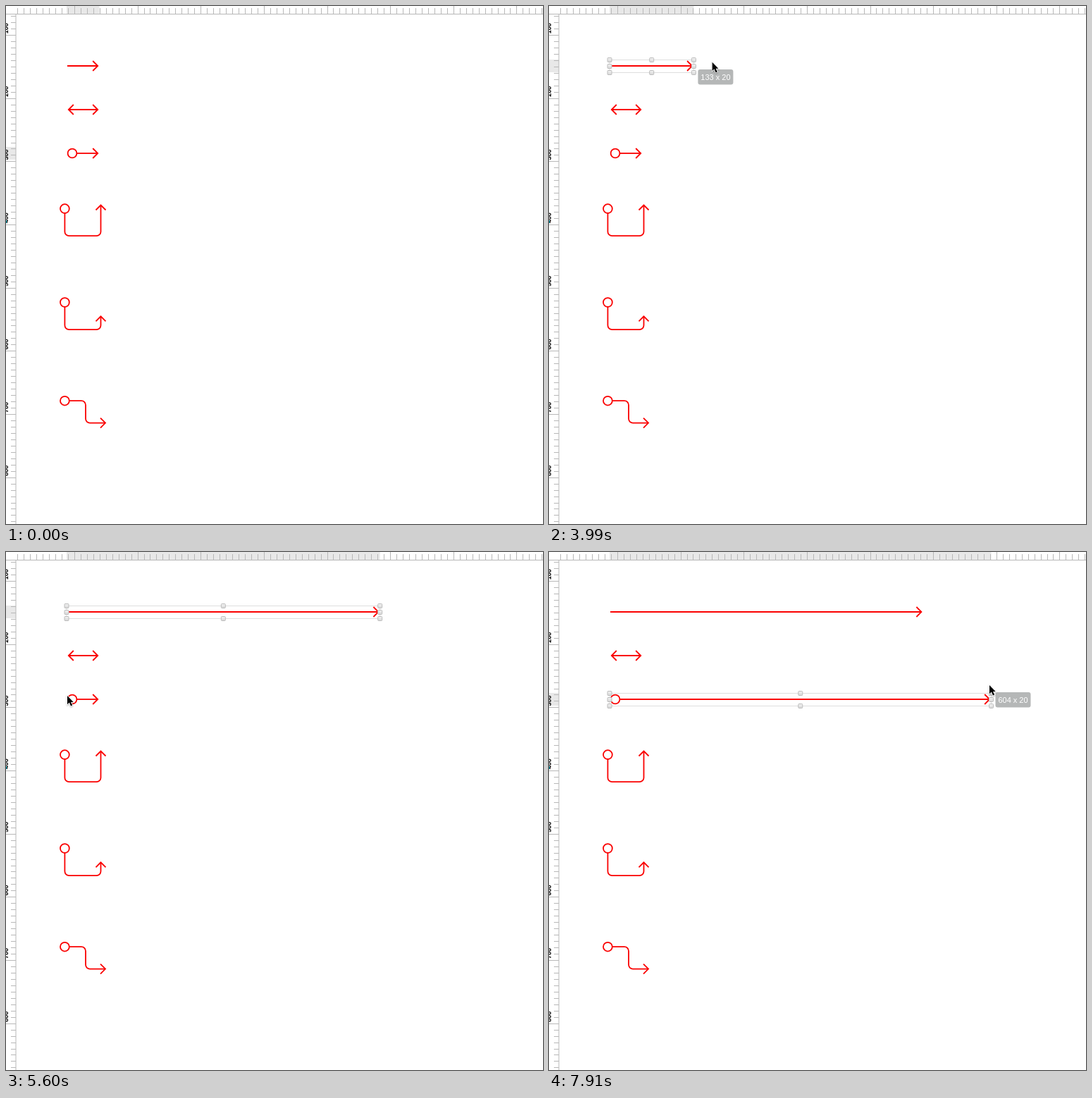
Animation of 762 by 735 pixels, one loop 8000 ms. Source, as an HTML page with a canvas:

```html
<!DOCTYPE html>
<html lang="en">
<head>
<meta charset="utf-8">
<title>Resizable arrows</title>
<style>
  html, body { margin: 0; width: 100%; height: 100%; overflow: hidden; background: #fff; }
  canvas { display: block; }
</style>
</head>
<body>
<canvas id="stage" width="762" height="735"></canvas>
<script>
const ctx = document.getElementById('stage').getContext('2d');
const W = 762, H = 735, LOOP = 8000, STEP = 70;
const SCALE = 0.8965;          // pixels per document unit
const LEFT = 86, SHORT = 132.5;
const ROW1 = 85, ROW2 = 147, ROW3 = 209;
const FONT = '"Liberation Sans", Arial, sans-serif';

const easeIn = p => u => u ** p;
const easeOut = p => u => 1 - (1 - u) ** p;
// Smoothstep; powers below 1 start it faster
const smooth = (p = 1) => u => { const v = u ** p; return v * v * (3 - 2 * v); };

// Key points: [time, values, easing from the previous point]
const edge1 = [
  [3780, [SHORT]], [4690, [530.7], smooth(0.885)]
];
const edge3 = [
  [6650, [SHORT]], [7140, [352.3], easeIn(1.46)], [7910, [627.5], easeOut(4.3)]
];
const pointer = [
  [700, [319, -8]], [840, [303, 5]], [980, [281, -5]],
  [1890, [202, -5]], [2240, [87, 90], smooth()], [2520, [115, 79.5], smooth()],
  [3080, [115, 79.5]], [3500, [130, 83], easeOut(2)],
  [3780, [130, 83]], [3850, [146, 80]], [4690, [528, 79], smooth(0.66)],
  [4830, [528, 79]], [5600, [87, 204], smooth()],
  [5810, [87, 204]], [6370, [135, 207], smooth()],
  [6650, [135, 207]], [7140, [466, 198], easeIn(1.46)], [7910, [625, 189], easeOut(4)]
];

function at(keys, t) {
  const next = keys.findIndex(k => t < k[0]);
  if (next === 0) return keys[0][1];
  if (next < 0) return keys[keys.length - 1][1];
  const [t0, from] = keys[next - 1];
  const [t1, to, ease = u => u] = keys[next];
  const k = ease((t - t0) / (t1 - t0));
  return from.map((v, i) => v + (to[i] - v) * k);
}

function rect(x, y, w, h, color) {
  ctx.fillStyle = color;
  ctx.fillRect(x, y, w, h);
}

function rulers(right, rowY) {
  rect(LEFT, 0, right - LEFT, 11, '#e8e8e8');
  rect(0, rowY - 9, 14, 18, '#e8e8e8');
  const grey = '#b8b8b8', gap = 10 * SCALE;
  rect(0, 11, W, 1, grey);
  rect(13.5, 11, 1, H, grey);
  for (let i = -9; i < 75; i++) {
    const x = Math.round(96.9 + i * gap), len = i % 10 ? 8 : 11;
    rect(x, 11 - len, 1, len, grey);
  }
  for (let i = -3; i < 78; i++) {
    const y = Math.round(41.1 + i * gap), len = i % 10 ? 7 : 14;
    if (y > 11) rect(14 - len, y, len, 1, grey);
  }
  ctx.fillStyle = '#000';
  ctx.font = 'bold 9px ' + FONT;
  ctx.textAlign = 'left';
  for (let n = 1; n <= 8; n++) {
    ctx.save();
    ctx.translate(3, 39.2 + (n - 1) * 100 * SCALE);
    ctx.rotate(-Math.PI / 2);
    ctx.fillText(n * 100, 0, 0);
    ctx.restore();
  }
  rect(0, 304, 1, 4, '#19b5c8');
}

function ring(x, y) {
  ctx.beginPath();
  ctx.arc(x, y, 6.4, 0, Math.PI * 2);
  ctx.stroke();
}

function line(...pts) {
  ctx.beginPath();
  pts.forEach(([x, y]) => ctx.lineTo(x, y));
  ctx.stroke();
}

// Polyline with rounded corners
function bend(...pts) {
  ctx.beginPath();
  ctx.moveTo(...pts[0]);
  for (let i = 1; i < pts.length - 1; i++) ctx.arcTo(...pts[i], ...pts[i + 1], 6);
  ctx.lineTo(...pts[pts.length - 1]);
  ctx.stroke();
}

const headX = (x, y, d) => line([x - 7 * d, y - 7], [x, y], [x - 7 * d, y + 7]);
const headUp = (x, y) => line([x - 7, y + 7], [x, y], [x + 7, y + 7]);

function arrowRight(x0, x1, y) {
  line([x0, y], [x1, y]);
  headX(x1, y, 1);
}

function shapes(right1, right3) {
  ctx.strokeStyle = '#fa0000';
  ctx.lineWidth = 1.8;
  arrowRight(87, right1 - 2.3, ROW1);

  arrowRight(88.8, SHORT - 2.3, ROW2);
  headX(88.8, ROW2, -1);

  ring(94, ROW3);
  arrowRight(100.4, right3 - 2.3, ROW3);

  for (const [top, tip] of [[287.6, 282.5], [420.5, 440.3]]) {
    const base = top + 38.6;
    ring(83.4, top);
    bend([83.4, top + 6.4], [83.4, base], [134.5, base], [134.5, tip]);
    headUp(134.5, tip);
  }

  ring(83.4, 560.2);
  bend([89.8, 560.2], [113, 560.2], [113, 591.6], [141, 591.6]);
  headX(141, 591.6, 1);
}

function handle(x, y) {
  const g = ctx.createLinearGradient(0, y - 3, 0, y + 3);
  g.addColorStop(0, '#f4f4f4');
  g.addColorStop(1, '#d6d6d6');
  ctx.beginPath();
  ctx.roundRect(x - 3, y - 3, 6, 6, 1);
  ctx.fillStyle = g;
  ctx.fill();
  ctx.strokeStyle = '#bcbcbc';
  ctx.lineWidth = 1;
  ctx.stroke();
}

function selection(right, y) {
  ctx.strokeStyle = '#dedede';
  ctx.lineWidth = 1;
  ctx.strokeRect(LEFT, y - 8.5, right - LEFT, 18);
  const mid = (LEFT + right) / 2;
  for (const dy of [-9, 0, 9])
    for (const x of [LEFT, mid, right])
      if (dy || x !== mid) handle(x, y + dy + 0.5);
}

function sizeTag(right, y) {
  const x = right + 6;
  ctx.beginPath();
  ctx.roundRect(x, y, 50, 21.5, 3);
  ctx.fillStyle = '#b5b7b7';
  ctx.fill();
  ctx.fillStyle = '#fff';
  ctx.font = '11px ' + FONT;
  ctx.textAlign = 'center';
  ctx.fillText(Math.round((right - LEFT) / SCALE) + ' x 20', x + 25, y + 15);
}

const arrow = new Path2D('M0 0V12.2L2.8 9.6L5 14.6L7.2 13.6L5 8.9H8.7Z');

function cursor(x, y) {
  ctx.save();
  ctx.translate(x, y);
  ctx.shadowColor = 'rgba(0,0,0,.3)';
  ctx.shadowBlur = 2;
  ctx.shadowOffsetY = 1;
  ctx.strokeStyle = '#fff';
  ctx.lineWidth = 1.6;
  ctx.stroke(arrow);
  ctx.shadowColor = 'transparent';
  ctx.fillStyle = '#000';
  ctx.fill(arrow);
  ctx.restore();
}

function draw(time) {
  const t = Math.floor(time / STEP) * STEP;
  const [right1] = at(edge1, t), [right3] = at(edge3, t);
  const first = t >= 2940 && t < 5880;
  const right = first ? right1 : right3;
  const row = first ? ROW1 : ROW3;
  const tagged = (t >= 3850 && t < 4900) || t >= 6720;
  const pointing = (t >= 700 && t < 1050) || t >= 1890;

  rect(0, 0, W, H, '#fff');
  // The ruler trails by one step during the second, faster drag
  rulers(first ? right1 : at(edge3, t - STEP)[0], row);
  shapes(right1, right3);
  if (t >= 2940) selection(right, row);
  if (tagged) sizeTag(right, at(pointer, t - 2 * STEP)[1] + 10);
  if (pointing) cursor(...at(pointer, t));
}

const start = performance.now();
function tick(now) {
  draw(Math.max(0, now - start) % LOOP);
  requestAnimationFrame(tick);
}
draw(0);
requestAnimationFrame(tick);
</script>
</body>
</html>
```
